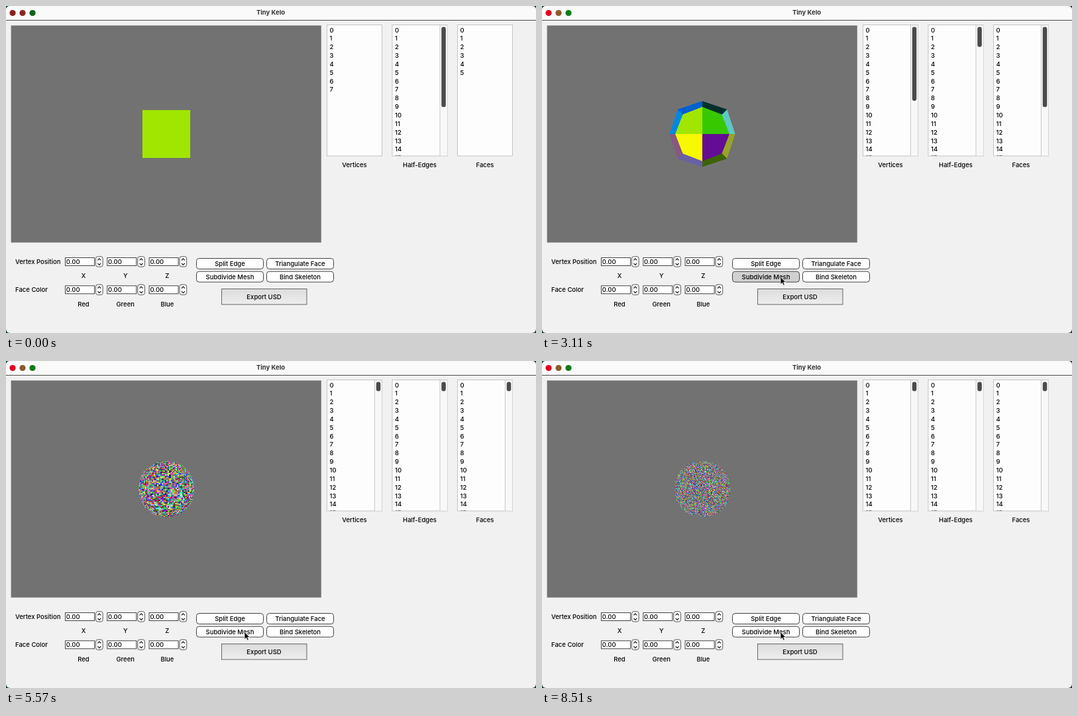
Animation of 800 by 493 pixels, one loop 8570 ms. Source, as an HTML page with a canvas:

```html
<!DOCTYPE html>
<html lang="en">
<head>
<meta charset="utf-8">
<title>Tiny Kelo</title>
<style>
html, body { margin: 0; width: 100%; height: 100%; overflow: hidden; background: #0f3b33; }
svg, canvas { position: absolute; display: block; }
#ui { left: 0; top: 0; }
#view { left: 8px; top: 29px; }
#cursor { left: 0; top: 0; overflow: visible; }
text { font: 500 9.5px Inter, sans-serif; fill: #000; }
.title { font-weight: 700; fill: #333; }
.mid { text-anchor: middle; }
</style>
</head>
<body>
<svg id="ui" width="800" height="493"></svg>
<canvas id="view" width="468" height="328"></canvas>
<svg id="cursor" width="12" height="18">
  <path d="M0 0V11.2L2.6 8.8L4.4 12.8L6.3 12L4.6 8.1H8Z" fill="#000" stroke="#fff" stroke-width=".8"/>
</svg>
<script>
const LOOP = 8570;
const FOCAL = 164 / Math.tan(Math.PI / 8);
const NEAR = 4, FAR = 6;
const CLICKS = [2450, 3180, 3720, 4300, 5250, 6450, 7950];
const LISTS = [['Vertices', 484], ['Half-Edges', 582.5], ['Faces', 681]];
const $ = id => document.getElementById(id);

// ---- window and widgets ----
const rect = (x, y, w, h, fill, stroke = 'none', r = 0, extra = '') =>
  `<rect x="${x}" y="${y}" width="${w}" height="${h}" rx="${r}" fill="${fill}" stroke="${stroke}" ${extra}/>`;
const label = (s, x, y, cls = '') => `<text x="${x}" y="${y + 3.4}" class="${cls}">${s}</text>`;

function spinBox(x, y) {
  const cx = x + 51.8;
  return rect(x + .5, y + .5, 44, 12, '#fff', '#444') + label('0.00', x + 1.8, y + 6.6) +
    rect(x + 46.5, y - 1.3, 10.6, 15.4, '#fff', '#555', 3) +
    `<path d="M${cx - 2.5} ${y + 4.4}l2.5 -2.5l2.5 2.5M${cx - 2.5} ${y + 8.8}l2.5 2.5l2.5 -2.5" fill="none" stroke="#111" stroke-width="1.2"/>`;
}

const button = (s, x, y, extra = '') =>
  rect(x + .5, y + .5, 101, 16, '#fff', '#444', 4, extra) + label(s, x + 51, y + 8.4, 'mid');

function list([name, x], i) {
  let rows = '';
  for (let n = 0; n < 16; n++) rows += label(n, x + 4.5, 36.1 + n * 12.85, 'row' + i);
  return rect(x + .5, 28.5, 83, 197.5, '#fdfdfd', '#c4c4c4') +
    `<g clip-path="url(#rows)">${rows}</g>` +
    `<g id="bar${i}">` + rect(x + 72.5, 29, 10.8, 196.5, '#f8f8f8') +
    `<path d="M${x + 72.5} 29V226" stroke="#c8c8c8"/>` +
    rect(x + 74.8, 31.5, 6.5, 14, '#4a4a4a', 'none', 3.2, `id="thumb${i}"`) + '</g>' +
    label(name, x + 42, 240, 'mid');
}

const spinRow = (name, y, axes) => label(name, 14, y + 6.5) +
  axes.map((a, i) => spinBox(89 + i * 63.3, y) + label(a, 117 + i * 63.2, y + 28, 'mid')).join('');

$('ui').innerHTML =
  `<defs><clipPath id="rows"><rect x="484" y="29" width="300" height="196.5"/></clipPath>
  <linearGradient id="shade" x2="0" y2="1"><stop stop-color="#dcdcdc"/><stop offset="1" stop-color="#eee"/></linearGradient></defs>` +
  rect(0, 0, 800, 493, '#f1f1f1', 'none', 6) +
  '<path d="M0 21V6Q0 0 6 0H794Q800 0 800 6V21Z" fill="#fafafa"/><path d="M0 21.5H800" stroke="#4c4c4c"/>' +
  [10, 25, 40].map((x, i) => `<circle id="light${i}" cx="${x}" cy="10.5" r="4.6"/>`).join('') +
  label('Tiny Kelo', 399.5, 10, 'mid title') +
  rect(7.6, 29.4, 468.2, 327.2, '#727272') +
  LISTS.map(list).join('') +
  spinRow('Vertex Position', 379, ['X', 'Y', 'Z']) +
  spinRow('Face Color', 421.3, ['Red', 'Green', 'Blue']) +
  button('Split Edge', 287, 380) + button('Triangulate Face', 393, 380) +
  button('Subdivide Mesh', 287, 399.7, 'id="subdivide"') + button('Bind Skeleton', 393, 399.7) +
  rect(325.5, 426.5, 128.5, 23.5, 'url(#shade)', '#666') + label('Export USD', 389.5, 438.5, 'mid');

// ---- Catmull-Clark meshes ----
let seed = 7;
const random = () => (seed = (Math.imul(seed, 1664525) + 1013904223) >>> 0) / 4294967296;
const randomColor = () => '#' + (random() * 0x1000000 | 0).toString(16).padStart(6, '0');

// Colours of the first subdivision, counter-clockwise from the left
const FRONT = ['#f8f800', '#640c94', '#38c800', '#a0e600'];
const RING = ['#885880', '#6860a4', '#3c6404', '#98a428', '#60c8c4', '#04302c', '#0060d0', '#0088e0'];

function firstColor([x, y, z]) {
  const turn = Math.atan2(y, x) / (2 * Math.PI) + .5;
  const colors = z > Math.max(Math.abs(x), Math.abs(y)) ? FRONT : RING;
  return colors[Math.floor(turn * colors.length) % colors.length];
}

const sum = (...p) => [0, 1, 2].map(k => p.reduce((s, q) => s + q[k], 0));
const times = (p, s) => [p[0] * s, p[1] * s, p[2] * s];
const add = (p, q, s) => { p[0] += q[0] * s; p[1] += q[1] * s; p[2] += q[2] * s; };

function subdivide({ points, faces, colors }, first) {
  const count = points.length;
  const acc = points.map(() => [0, 0, 0]), valence = new Uint8Array(count);
  const next = new Array(count), edges = new Map(), outFaces = [], outColors = [];
  const keyOf = (a, b) => a < b ? a * count + b : b * count + a;
  const centers = faces.map(f => times(sum(...f.map(i => points[i])), .25));
  faces.forEach((f, n) => f.forEach((a, i) => {
    const b = f[(i + 1) % 4], key = keyOf(a, b);
    valence[a]++;
    add(acc[a], centers[n], 1);
    add(acc[a], points[a], 1);
    add(acc[a], points[b], 1);
    let e = edges.get(key);
    if (e === undefined) {
      edges.set(key, e = next.length);
      next.push(times(sum(points[a], points[b]), .25));
    }
    add(next[e], centers[n], .25);
  }));
  points.forEach((p, i) => {
    const n = valence[i], q = times(acc[i], 1 / (n * n));
    add(q, p, (n - 3) / n);
    next[i] = q;
  });
  faces.forEach((f, n) => {
    const c = next.push(centers[n]) - 1;
    f.forEach((a, i) => {
      const quad = [a, edges.get(keyOf(a, f[(i + 1) % 4])), c, edges.get(keyOf(f[(i + 3) % 4], a))];
      outFaces.push(quad);
      outColors.push(first ? firstColor(sum(...quad.map(k => next[k]))) : i ? randomColor() : colors[n]);
    });
  });
  return { points: next, faces: outFaces, colors: outColors };
}

function drawMesh(g, mesh, depth) {
  const pts = mesh.points.map(([x, y, z]) => [x * FOCAL / (depth - z), -y * FOCAL / (depth - z)]);
  g.lineWidth = .2;
  mesh.faces.forEach((f, n) => {
    const [a, b, c, d] = f.map(i => pts[i]);
    const facing = (c[0] - a[0]) * (d[1] - b[1]) - (c[1] - a[1]) * (d[0] - b[0]) < 0;
    if (!facing) return;
    g.beginPath();
    g.moveTo(...a); g.lineTo(...b); g.lineTo(...c); g.lineTo(...d);
    g.closePath();
    g.fillStyle = g.strokeStyle = mesh.colors[n];
    g.fill();
    g.stroke();
  });
}

const corner = (i, bit) => i & bit ? .5 : -.5;
const cube = {
  points: Array.from({ length: 8 }, (_, i) => [corner(i, 1), corner(i, 2), corner(i, 4)]),
  faces: [[4, 5, 7, 6], [1, 0, 2, 3], [5, 1, 3, 7], [0, 4, 6, 2], [6, 7, 3, 2], [0, 1, 5, 4]],
  colors: Array(6).fill('#a0e600')
};

// Each level is drawn enlarged once and point-sampled on screen, like a renderer without smoothing
const SIZE = 120, SCALE = 3;
let mesh = cube;
const sprites = CLICKS.map((_, i) => {
  mesh = subdivide(mesh, i === 0);
  const c = document.createElement('canvas');
  c.width = c.height = SIZE * SCALE;
  const g = c.getContext('2d');
  g.scale(SCALE, SCALE);
  g.translate(SIZE / 2, SIZE / 2);
  drawMesh(g, mesh, NEAR);
  return c;
});

// ---- playback ----
const view = $('view').getContext('2d');
view.imageSmoothingEnabled = false;
view.translate(234, 164);
const ramp = (t, a, b) => Math.min(1, Math.max(0, (t - a) / (b - a)));
const ease = k => k * k * (3 - 2 * k);
let shown = -1;

function showCounts(level) {
  const n = 4 ** level;
  [6 * n + 2, 24 * n, 6 * n].forEach((total, i) => {
    document.querySelectorAll('.row' + i).forEach((row, k) => row.style.display = k < total ? '' : 'none');
    $('bar' + i).style.display = total > 15 ? '' : 'none';
    $('thumb' + i).setAttribute('height', Math.max(14, 2900 / total));
  });
}

function render(t) {
  const level = CLICKS.filter(c => t >= c).length;
  if (level !== shown) showCounts(shown = level);

  view.clearRect(-234, -164, 468, 328);
  if (level) view.drawImage(sprites[level - 1], -SIZE / 2, -SIZE / 2, SIZE, SIZE);
  else drawMesh(view, cube, FAR + (NEAR - FAR) * ramp(t, 760, 1400));

  const pressed = CLICKS.some(c => t >= c - 120 && t < c);
  $('subdivide').setAttribute('fill', pressed ? '#d0d0d0' : '#fff');
  const lights = t < 60 ? ['#8c2020', '#8c2424', '#106018'] : ['#e0001c', '#8c5a28', '#107c18'];
  lights.forEach((c, i) => $('light' + i).setAttribute('fill', c));

  const enter = ease(ramp(t, 1300, 1700)), settle = ease(ramp(t, 1740, 2100));
  const x = 410 - 41 * enter - 9 * settle, y = 310 + 95 * enter + 3.5 * settle;
  $('cursor').style.transform = `translate(${x}px, ${y}px)`;
  $('cursor').style.visibility = t < 1300 ? 'hidden' : 'visible';
}

const start = performance.now();
function tick() {
  render((performance.now() - start) % LOOP);
  requestAnimationFrame(tick);
}
tick();
</script>
</body>
</html>
```
